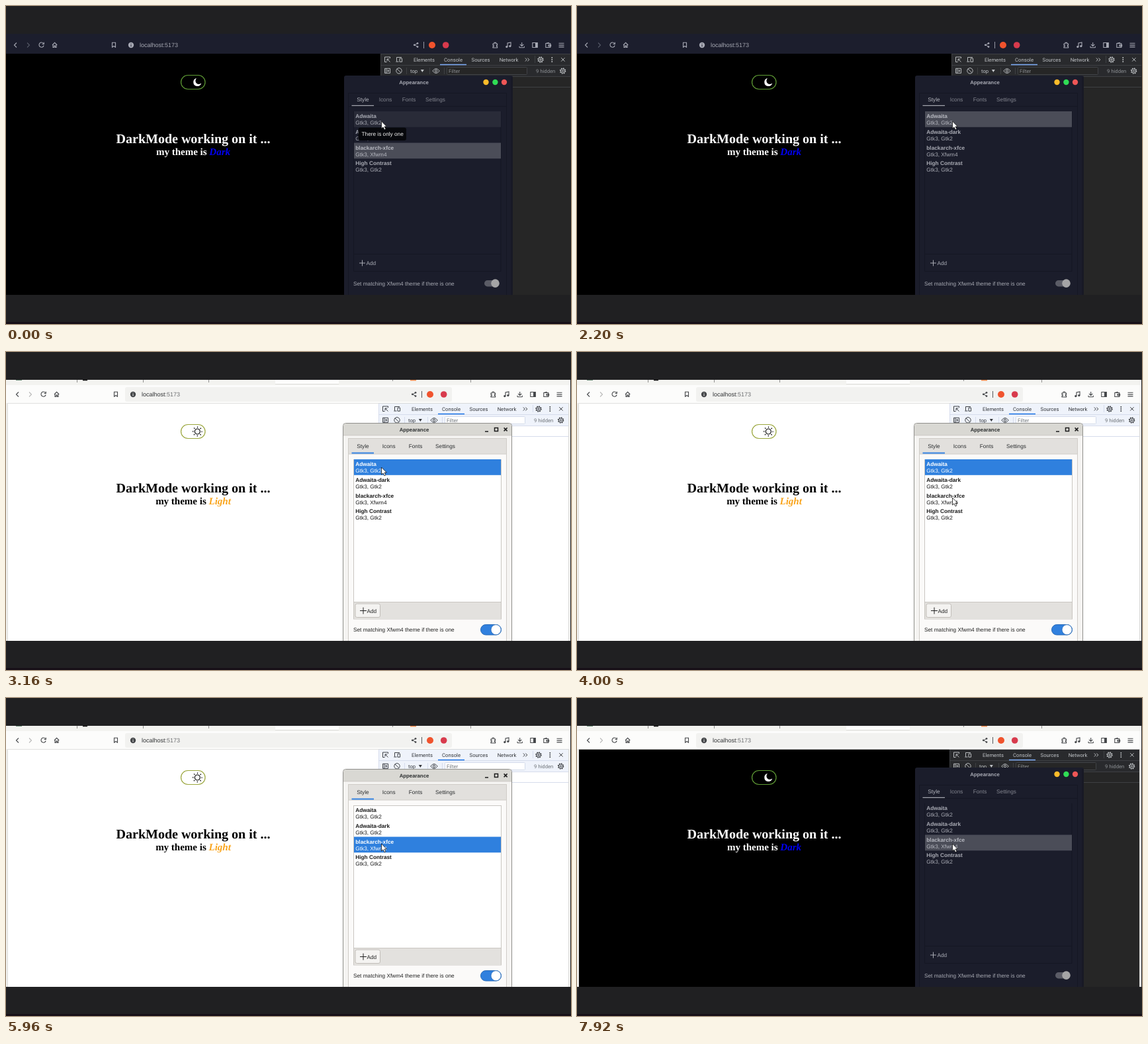
These frames come from a looping animation (854x480 px, 8 s). An HTML page:

```html
<!DOCTYPE html>
<html lang="en">
<head>
<meta charset="utf-8">
<title>Dark mode follows the desktop theme</title>
<style>
html, body { margin: 0; width: 100%; height: 100%; overflow: hidden; background: #202022; }
svg {
  display: block; width: 854px; height: 480px;
  --page: #fff; --ink: #000; --pill: #9aa63c;
  --bar: #eff3fb; --pane: #fff; --edge: #d3daea; --dt: #34373b; --dim: #70757a; --blue: #1a73e8;
  --win: #1a1a1a; --selBg: #2f80de; --selInk: #fff; --hover: #f0f0f0;
  --chrome: #1c1e2d; --icon: #a6a8b3; --weak: #555866; --url: #a9abb5; --port: #a0a2ac;
}
svg.dark {
  --page: #000; --ink: #fff; --pill: #5f9c35;
  --bar: #292a2d; --pane: #262626; --edge: #414347; --dt: #bfc2c6; --dim: #8c8f93; --blue: #7cacf8;
  --win: #a9abb4; --selBg: #4b4d58; --selInk: #b7b9c1; --hover: #292b38;
}
svg.lite { --chrome: #fcfcfb; --icon: #45474a; --weak: #b8b8b8; --url: #303234; --port: #707274; }
text { font: 8.25px "Liberation Sans", Arial, sans-serif; text-rendering: geometricPrecision; }
.b { font-weight: bold; }
.mid { text-anchor: middle; }
.serif { font: bold 20px "Liberation Serif", "Times New Roman", serif; }
.small { font-size: 15px; }
.dev text { font: 7.7px Roboto, sans-serif; fill: var(--dt); }
.line { fill: none; stroke: var(--icon); stroke-width: 1.1; }
.dev .line { stroke: var(--dt); stroke-width: .95; }
.solid { fill: var(--icon); }
.rows text { fill: var(--win); }
.rows rect { fill: none; }
.rows .hover rect { fill: var(--hover); }
.rows .sel rect { fill: var(--selBg); }
.rows .sel text { fill: var(--selInk); }
.faint { fill: none; stroke: #151723; }
.bare .faint, .dark .onLight, svg:not(.dark) .onDark, svg:not(.lite) .onLite { display: none; }
</style>
</head>
<body>
<svg id="stage" viewBox="0 0 854 480">
  <defs>
    <g id="gear"><circle r="3.2"/><circle r="1.2"/><circle r="4" stroke-dasharray="1.57" stroke-width="1.4"/></g>
    <clipPath id="screen"><rect y="42" width="853" height="394"/></clipPath>
  </defs>
  <rect width="854" height="480" fill="#202022"/>
  <rect y="477" width="854" height="3" fill="#170f17"/>

  <g clip-path="url(#screen)">
    <rect y="42" width="853" height="394" fill="var(--chrome)"/>

    <g class="onLite">
      <rect y="42" width="853" height="8" fill="#f3f3f0"/>
      <rect x="407" y="42" width="96" height="6" fill="#fdfdfc"/>
      <path d="M407 48.5h96" stroke="#dededb"/>
      <path d="M107.5 42v4M207.5 42v4M306.5 42v4M584.5 42v2M702.5 42v4" stroke="#777" stroke-width=".8"/>
      <path d="M15 42.5h9" stroke="#6f8f7c"/>
      <path d="M116 42.5h7" stroke="#111" stroke-width="1.5"/>
      <path d="M611 42.7h9" stroke="#f28d4f" stroke-width="1.4"/>
      <rect x="180" y="53" width="494" height="22" rx="3" fill="#f2f2f0"/>
    </g>

    <g id="left">
      <path class="line" d="M16 55.5l-3.5 3.5 3.5 3.5M56.5 56.5a3.6 3.6 0 1 0 .6 3M57.3 54.8v2.7h-2.7M70 59l3.6-3.6 3.6 3.6M71 58.5v4h1.8v-2.4h1.6v2.4H76v-4M160.5 55.3h5v7l-2.5-1.8-2.5 1.8z"/>
      <path class="line" style="stroke:var(--weak)" d="M32 55.5l3.5 3.5-3.5 3.5"/>
      <circle class="solid" cx="189" cy="59" r="4.2"/>
      <path d="M189 58.5v2.8M189 56.4v1" stroke="var(--chrome)"/>
      <text x="202" y="62" style="font-size:9px" fill="var(--url)">localhost<tspan fill="var(--port)">:5173</tspan></text>
    </g>

    <g id="right">
      <path class="line" style="stroke-width:.9" d="M622 56.5l-4.5 2.3 4.5 2.6"/>
      <circle class="solid" cx="622" cy="56.3" r="1.4"/><circle class="solid" cx="617.3" cy="58.8" r="1.4"/><circle class="solid" cx="622" cy="61.6" r="1.4"/>
      <path d="M631.5 54v10" stroke="var(--icon)" stroke-width=".9"/>
      <circle cx="644" cy="59" r="5" fill="#f0532d"/>
      <circle cx="664.7" cy="59" r="4.8" fill="#d83a4c"/>
      <path class="line" d="M736 57h2v-1.6h2.6V57h2v2.2h-1.2v1.8h1.2v2H736v-1.8h1.2v-2H736zM758 61.5v-5.5l5-1v5.5M776 62.8h7.4M779.7 55v5M777 57.8l2.7 2.6 2.7-2.6M776 60.8v2M783.4 60.8v2M795.8 55.5h7.5v7h-7.5zM815.8 56.5h7v6h-7zM815.8 56.5l5-1.3M820 58.6h3.6v2H820zM835.5 56.3h8M835.5 59.1h8M835.5 61.9h8"/>
      <circle class="solid" cx="756.8" cy="61.6" r="1.6"/><circle class="solid" cx="761.8" cy="60.6" r="1.6"/>
      <path class="solid" d="M800 55.5h3.3v7H800z"/>
    </g>

    <g id="web">
      <rect y="72" width="853" height="370" fill="var(--page)"/>
      <rect x="264.5" y="104.5" width="36.5" height="21" rx="10.5" fill="none" stroke="var(--pill)" stroke-width="1.2"/>
      <path class="onDark" fill="#fff" d="M288 109a6.1 6.1 0 1 0 7.2 7.6a5.2 5.2 0 0 1-7.2-7.6z"/>
      <g class="onLight" transform="translate(289.3 115)" fill="none" stroke="#111" stroke-width="1.2">
        <circle r="4"/>
        <circle r="6.6" stroke-width="2" stroke-dasharray="1.2 3.984" stroke-dashoffset=".6"/>
      </g>
      <text class="serif mid" x="283" y="206.5" fill="var(--ink)">DarkMode working on it ...</text>
      <text class="serif small mid" x="283" y="224.7" fill="var(--ink)">my theme is <tspan id="theme" font-style="italic"></tspan></text>
    </g>

    <g id="dev" class="dev">
      <rect x="566" y="72" width="290" height="370" fill="var(--pane)"/>
      <rect x="566" y="72" width="290" height="34" fill="var(--bar)"/>
      <path d="M566 72.5h290M566 89.5h290M566 106.5h290M566 122.5h290M566.5 72v370M605.5 93v10M640.5 93v10M662.5 93v10M799.5 75v11" fill="none" stroke="var(--edge)" stroke-width=".9"/>
      <path class="line" d="M580.5 79v-2h-8v7.5h3M576 80l4.5 4.5M576 83.3V80h3.3M590.5 83.5v-6h7.5M589.3 84h4.2M595 79.2h3.6v5H595zM784.8 78.5l2.5 2.5-2.5 2.5M788.3 78.5l2.5 2.5-2.5 2.5M839.2 78.2l5.4 5.4M844.6 78.2l-5.4 5.4M572.5 94.3h8v7h-8zM574.7 94.3v7M577 96.2l2 1.6-2 1.6zM591 94.8l6 6M644.8 98q5.2-7 10.4 0q-5.2 7-10.4 0z"/>
      <circle class="line" cx="594" cy="97.8" r="4.2"/><circle class="line" cx="650" cy="98" r="1.7"/>
      <use class="line" href="#gear" x="808" y="81"/><use class="line" href="#gear" x="841.6" y="98"/>
      <g fill="var(--dt)">
        <circle cx="825.3" cy="78" r=".95"/><circle cx="825.3" cy="81" r=".95"/><circle cx="825.3" cy="84" r=".95"/>
        <path d="M626.8 96h5l-2.5 4z"/>
      </g>
      <text class="mid" x="632" y="83.8">Elements</text>
      <text class="mid" x="676" y="83.8">Console</text>
      <text class="mid" x="717.5" y="83.8">Sources</text>
      <text class="mid" x="760" y="83.8">Network</text>
      <path d="M656 88.6h40" stroke="var(--blue)" stroke-width="1.5"/>
      <text x="611" y="100.8">top</text>
      <rect x="666.5" y="92.5" width="121" height="11" rx="1" fill="var(--pane)" stroke="var(--edge)"/>
      <text x="669" y="101" style="fill:var(--dim)">Filter</text>
      <text x="801" y="100.8" style="fill:var(--dim)">9 hidden</text>
    </g>

    <g class="onLite" fill="#efefed">
      <path d="M0 77h3v360H0zM850 77h3v360h-3z"/>
      <path d="M2.5 77v360M850.5 77v360M3 77.5h847" fill="none" stroke="#d9d9d6" stroke-width=".8"/>
    </g>

    <g class="onDark">
      <rect x="511" y="105" width="255" height="340" rx="3" fill="#1b1d2b"/>
      <path d="M764.5 107v330" stroke="#181925" stroke-width="3"/>
      <path class="faint" d="M517.5 440V131.5h239V440M518 151.5h238M525.5 159v241.5h222.5V159M526 374.5h222"/>
      <text class="b mid" x="616.5" y="118.4" style="font-size:7.8px" fill="#a9abb4">Appearance</text>
      <circle cx="725.5" cy="115" r="4.2" fill="#fdbb2a"/><circle cx="739.4" cy="115" r="4.2" fill="#2fdc55"/><circle cx="753" cy="115" r="4.2" fill="#ee5656"/>
      <path d="M522.5 150.3h33.5" stroke="#a3a5ae" stroke-width="1.2"/>
      <g class="mid" fill="#83858f">
        <text x="539.5" y="144" fill="#b4b6be">Style</text><text x="573.5" y="144">Icons</text><text x="609" y="144">Fonts</text><text x="649" y="144">Settings</text>
      </g>
      <path d="M534 388h9M538.5 383.5v9" stroke="#a9abb4"/>
      <g fill="#a9abb4"><text x="544.5" y="391">Add</text><text x="525" y="421.6">Set matching Xfwm4 theme if there is one</text></g>
      <rect x="723" y="414" width="22" height="9.5" rx="4.7" fill="#5b5c66"/>
      <circle cx="739.5" cy="418.6" r="6.3" fill="#a5a5a6"/>
    </g>

    <g class="onLight">
      <rect x="509.5" y="107.5" width="255" height="340" rx="4" fill="#f5f4f2" stroke="#8f8f8b"/>
      <path d="M510 125.5v-13.5q0-4 4-4h246q4 0 4 4v13.5z" fill="#d9d8d3"/>
      <path d="M510 125.8h254" stroke="#bebcb7" stroke-width=".8"/>
      <rect x="517.5" y="130.5" width="239" height="320" fill="#fbfaf9" stroke="#cfccc7"/>
      <rect x="518" y="131" width="238" height="23" fill="#e2e0dd"/>
      <path d="M518 154h238" stroke="#cfccc7"/>
      <path d="M522.5 152.6h33.5" stroke="#3584e4" stroke-width="2"/>
      <rect x="525.5" y="162.5" width="223" height="240.5" fill="#fff" stroke="#c9c6c1"/>
      <path d="M526 377.5h222v25H526z" fill="#e3e1de"/><path d="M526 377.5h222" stroke="#c9c6c1"/>
      <rect x="528" y="380" width="37.5" height="20.5" rx="2.5" fill="#f4f3f1" stroke="#c2beb9"/>
      <text class="b mid" x="617" y="119.9" style="font-size:7.8px" fill="#2c2f30">Appearance</text>
      <path d="M724 120h5M738.5 114.5h5v5h-5zM752.6 114.4l5 5M757.6 114.4l-5 5" fill="none" stroke="#1c1c1c" stroke-width="1.5"/>
      <g class="mid" fill="#2b2e30">
        <text x="539.5" y="145.3">Style</text><text x="578.7" y="145.3">Icons</text><text x="619" y="145.3">Fonts</text><text x="664" y="145.3">Settings</text>
      </g>
      <path d="M535 390.5h10M540 385.5v10" stroke="#222"/>
      <g fill="#222"><text x="545.5" y="393.5">Add</text><text x="525" y="422.3">Set matching Xfwm4 theme if there is one</text></g>
      <rect x="717.5" y="411.5" width="31" height="15.5" rx="7.7" fill="#3080de" stroke="#2569b8"/>
      <circle cx="740.6" cy="419.2" r="7.6" fill="#fff" stroke="#2569b8" stroke-width=".8"/>
    </g>

    <g id="rows" class="rows"></g>

    <g id="tip">
      <rect x="532.5" y="183.5" width="72.5" height="19.5" rx="3" fill="#07080c"/>
      <text x="537.5" y="196" fill="#f2f2f2">There is only one</text>
    </g>
    <path id="cursor" d="M0 0v11l2.5-2.2 1.9 4 2-1-1.9-3.8h3.4z" fill="#fff" stroke="#111" stroke-width=".8"/>
  </g>
</svg>
<script>
const $ = id => document.getElementById(id);
const stage = $("stage"), rows = $("rows"), theme = $("theme");

rows.innerHTML = [
  ["Adwaita", "Gtk3, Gtk2"], ["Adwaita-dark", "Gtk3, Gtk2"],
  ["blackarch-xfce", "Gtk3, Xfwm4"], ["High Contrast", "Gtk3, Gtk2"]
].map(([name, kind], i) => `<g transform="translate(0 ${i * 23.75})">
  <rect x="526" y="159" width="222" height="23.8"/>
  <text class="b" x="528.3" y="169">${name}</text>
  <text x="528.3" y="179">${kind}</text></g>`).join("");

const move = (id, x, y) => $(id).setAttribute("transform", `translate(${x} ${y})`);

function draw(now) {
  const t = now % 8000;
  const dark = t < 2240 || t >= 7840;
  const lite = t >= 3160;
  const tip = t < 440;
  const selected = t >= 440 && t < 5400 ? 0 : 2;

  stage.classList.toggle("dark", dark);
  stage.classList.toggle("lite", lite);
  stage.classList.toggle("bare", t >= 7840 && t < 7920);
  theme.textContent = dark ? "Dark" : "Light";
  theme.setAttribute("fill", dark ? "#0000f4" : "#f9a41c");

  // the lighter browser frame is 3px wider at the sides and 5px taller
  const dx = lite ? 3 : 0, dy = lite ? 5 : 0;
  move("left", dx, dy);
  move("right", -dx, dy);
  move("dev", -dx, dy);
  move("web", 0, dy);

  move("rows", 0, dark ? 0 : 3);
  [...rows.children].forEach((row, i) => {
    row.classList.toggle("sel", i === selected);
    row.classList.toggle("hover", tip && i === 0);
  });
  $("tip").style.display = tip ? "" : "none";

  const k = Math.min(1, Math.max(0, (t - 3720) / 280));
  move("cursor", 567.5, 174 + 46 * k * k * (3 - 2 * k));
  requestAnimationFrame(draw);
}
requestAnimationFrame(draw);
</script>
</body>
</html>
```
